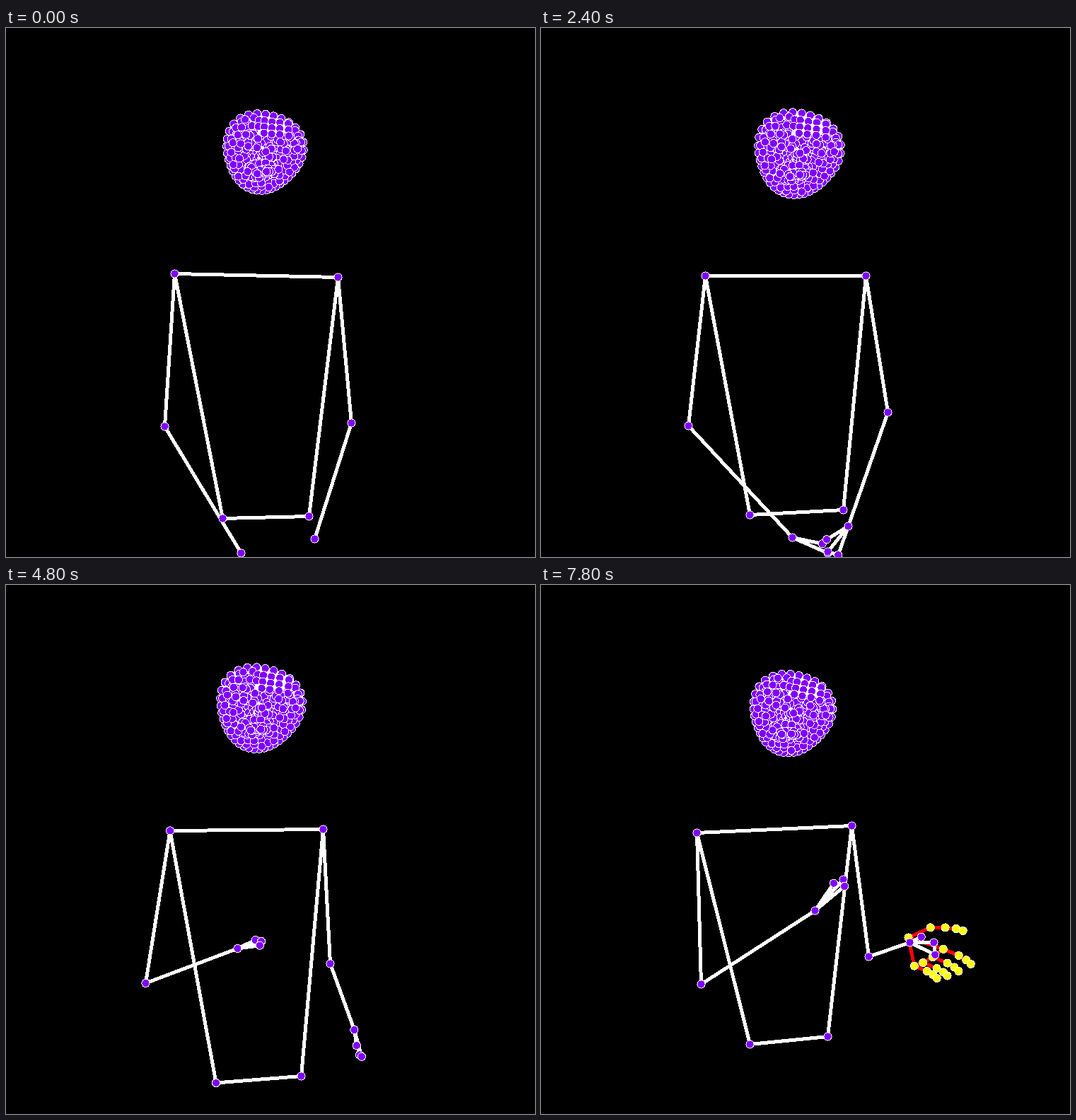
Write an HTML page that moves like this. It is 748x748 px and loops after 8000 ms.

```html
<!DOCTYPE html>
<html lang="en">
<head>
<meta charset="utf-8">
<title>Body tracking</title>
<style>
  html, body { margin: 0; width: 100%; height: 100%; overflow: hidden; background: #000; }
  svg { display: block; width: 100%; height: 100%; }
</style>
</head>
<body>
<svg id="stage" viewBox="0 0 748 748" shape-rendering="crispEdges"></svg>
<script>
const SIZE = 748, LOOP = 8000, STEP = 200;
const VIOLET = '#8000ff';
const TIMES = [0, 1400, 2400, 4000, 5600, 6600, 7800];
const { PI, cos, sin, atan2, hypot } = Math;
const stage = document.getElementById('stage');

// Key points x,y of each joint (l/r as seen on screen), one pair per key time
const joints = {
  lShoulder: [238,347, 239,348, 232,350, 227,353, 236,341, 223,347, 220,350],
  rShoulder: [469,352, 457,352, 459,350, 449,346, 447,344, 443,344, 439,340],
  lElbow: [224,563, 218,559, 208,562, 189,555, 205,570, 229,554, 226,564],
  rElbow: [488,558, 492,551, 490,543, 479,519, 437,551, 455,534, 463,525],
  lWrist: [332,742, 341,729, 355,720, 339,670, 315,357, 314,337, 387,460],
  rWrist: [436,722, 436,713, 434,704, 466,645, 518,612, 538,547, 521,505],
  lHip: [306,693, 307,691, 295,688, 288,669, 305,738, 307,688, 295,649],
  rHip: [428,690, 426,683, 427,681, 421,659, 413,729, 409,678, 405,638]
};

// Index fingertip from the wrist: dx, dy; then finger spread and thumb length ratio
const reach = {
  l: [[49, 29, .2, .78], [49, 29, .2, .78], [50, 22, .21, .79], [63, 36, .19, .82],
      [4, -56, .12, .77], [4, -67, .06, .66], [40, -44, .14, .79]],
  r: [[-29, 42, -.21, .76], [-29, 42, -.21, .76], [-29, 36, -.34, .77], [-18, 50, -.22, .76],
      [33, 21, .1, .48], [38, 13, .2, .43], [34, 0, .45, .53]]
};

// Detailed hands: offset from the body's wrist, palm matrix, finger turn and length
const greenPalm = [-4, -8, 1.2, -.24, .23, .81, 0, 1.05];
const redTimes = [5600, 6600, 7800];
const redPalms = [
  [-16, -15, 1, 0, 0, 1, 0, 1],
  [-16, -25, .96, .02, -.1, .99, -.35, 1.1],
  [-2, -7, .85, -.23, -.21, .65, -.54, .83]
];

// Head: centre x, y and mean radius
const head = [[364, 173, 54], [362, 177, 56], [363, 175, 58], [359, 171, 57],
  [358, 172, 58], [356, 171, 50], [354, 179, 55.5]];

const sideBones = ['Shoulder Elbow', 'Elbow Wrist', 'Shoulder Hip', 'Wrist Thumb',
  'Wrist Index', 'Wrist Pinky', 'Index Pinky'];
const bones = [['lShoulder', 'rShoulder'], ['lHip', 'rHip']];
for (const side of 'lr')
  for (const bone of sideBones) bones.push(bone.split(' ').map(name => side + name));

// Wrist is point 0, then four points per finger starting with the thumb
const handBones = [[0, 1], [0, 5], [0, 17], [5, 9], [9, 13], [13, 17]];
for (let base = 1; base < 21; base += 4)
  for (let k = 0; k < 3; k++) handBones.push([base + k, base + k + 1]);

const pairs = flat => TIMES.map((_, k) => flat.slice(2 * k, 2 * k + 2));
const tracks = Object.entries(joints).map(([name, flat]) => [name, pairs(flat)]);

function blend(rows, t, times = TIMES) {
  let i = 0;
  while (i < times.length - 2 && t >= times[i + 1]) i++;
  const f = Math.max(0, Math.min(1, (t - times[i]) / (times[i + 1] - times[i])));
  return rows[i].map((v, k) => v + (rows[i + 1][k] - v) * f);
}

const turn = (x, y, a) => [x * cos(a) - y * sin(a), x * sin(a) + y * cos(a)];

function bodyAt(t) {
  const body = {};
  for (const [name, rows] of tracks) body[name] = blend(rows, t);
  for (const side of 'lr') {
    const [dx, dy, spread, thumb] = blend(reach[side], t);
    const [x, y] = body[side + 'Wrist'];
    const tip = (angle, length) => {
      const [u, v] = turn(dx, dy, angle);
      return [x + u * length, y + v * length];
    };
    body[side + 'Thumb'] = tip(-spread, thumb);
    body[side + 'Index'] = tip(0, 1);
    body[side + 'Pinky'] = tip(spread, 1.7 - thumb);
  }
  return body;
}

function handPoints([wx, wy], [ox, oy, a, b, c, d, bend, length]) {
  const place = (x, y) => [wx + ox + a * x + b * y, wy + oy + c * x + d * y];
  const points = [place(0, 0)];
  for (let k = 1; k <= 4; k++) points.push(place(37 * k - 3.3 * k * k, 9 * k - 20));
  for (let i = 0; i < 4; i++) {
    const [x, y] = place(71 - 14 * i, 71 - 23 * (1 - i / 3) ** 2);
    const s = length * (1 - .06 * i);
    for (const [u, v] of [[0, 0], [17, 23], [24, 36], [27, 46]]) {
      const [p, q] = turn(u * s, v * s, bend);
      points.push([x + p, y + q]);
    }
  }
  return points;
}

let seed = 11;
function random() {
  seed = (seed * 16807) % 2147483647;
  return seed / 2147483647;
}

// Face mesh in unit-disc coordinates: rim, jittered rings, eyes, nose, lips, forehead grid
const RIM = 36;
const rim = [], inner = [];
for (let k = 0; k < RIM; k++) {
  const a = 2 * PI * k / RIM, angle = a + .3 * cos(a);
  rim.push([cos(angle), sin(angle)]);
}

function addRing(cx, cy, rx, ry, count, jitter) {
  for (let k = 0; k < count; k++) {
    const a = 2 * PI * (k + .5) / count;
    const u = cx + rx * cos(a) + jitter * (random() - .5);
    const v = cy + ry * sin(a) + jitter * (random() - .5);
    const forehead = v < -.42 && u > -.16 && u < .72;
    if (!forehead) inner.push([u, v]);
  }
}
for (let r = .92; r > .1; r -= .12) addRing(0, 0, r, r, Math.round(6 + 30 * r), .07);
for (const x of [-.52, .6])
  for (const r of [.1, .2, .3]) addRing(x, -.2, r, .6 * r, 16, .03);
for (let k = 1; k < 6; k++) addRing(-.04, .52, .07 * k, .04 * k, 20, .01);
for (const r of [.08, .16]) addRing(.05, .14, r, .7 * r, 14, .02);
for (let k = inner.length - 1; k > 0; k--) {
  const j = Math.floor(random() * (k + 1));
  [inner[k], inner[j]] = [inner[j], inner[k]];
}
for (let col = 0; col < 4; col++)
  for (let row = 0; row < 3; row++) {
    const u = -.02 + .21 * col;
    inner.push([u, -.82 + .17 * row + .2 * u * u]);
  }

const dot = ([x, y], color) =>
  `<circle cx="${x.toFixed(1)}" cy="${y.toFixed(1)}" r="5.6" fill="${color}" stroke="#fff"/>`;
const visible = ([x, y]) => x >= 0 && x <= SIZE && y >= 0 && y <= SIZE;

function drawGraph(points, links, lineColor, dotColor) {
  let d = '';
  for (const [a, b] of links) {
    const p = points[a], q = points[b];
    if (visible(p) && visible(q)) d += `M${p}L${q}`;
  }
  return `<path d="${d}" fill="none" stroke="${lineColor}" stroke-width="5" stroke-linecap="round"/>` +
    Object.values(points).filter(visible).map(p => dot(p, dotColor)).join('');
}

function drawHead(t) {
  const [cx, cy, radius] = blend(head, t);
  const tilt = .05 + .15 * t / LOOP;
  const place = ([u, v]) => {
    const angle = atan2(v, u) + tilt;
    const r = radius * hypot(u, v) * (1 + .055 * cos(3 * angle + PI / 4));
    return [cx + r * cos(angle), cy + r * sin(angle)];
  };
  const edge = rim.map(place);
  return `<polygon points="${edge.join(' ')}" fill="#fff" stroke="#fff" stroke-width="4"/>` +
    [...edge, ...inner.map(place)].map(p => dot(p, VIOLET)).join('');
}

function render(t) {
  const body = bodyAt(t);
  let out = drawHead(t);
  if (t >= 3400 && t < 4800)
    out += drawGraph(handPoints(body.lWrist, greenPalm), handBones, '#408000', '#0f0');
  if (t >= 5200)
    out += drawGraph(handPoints(body.rWrist, blend(redPalms, t, redTimes)), handBones, '#f00', '#ff0');
  out += drawGraph(body, bones, '#fff', VIOLET);
  stage.innerHTML = `<rect width="748" height="748"/><g transform="translate(.5 .5)">${out}</g>`;
}

let shown = -1;
const start = performance.now();
function tick() {
  const t = Math.floor((performance.now() - start) % LOOP / STEP) * STEP;
  if (t !== shown) render(shown = t);
  requestAnimationFrame(tick);
}
tick();
</script>
</body>
</html>
```
